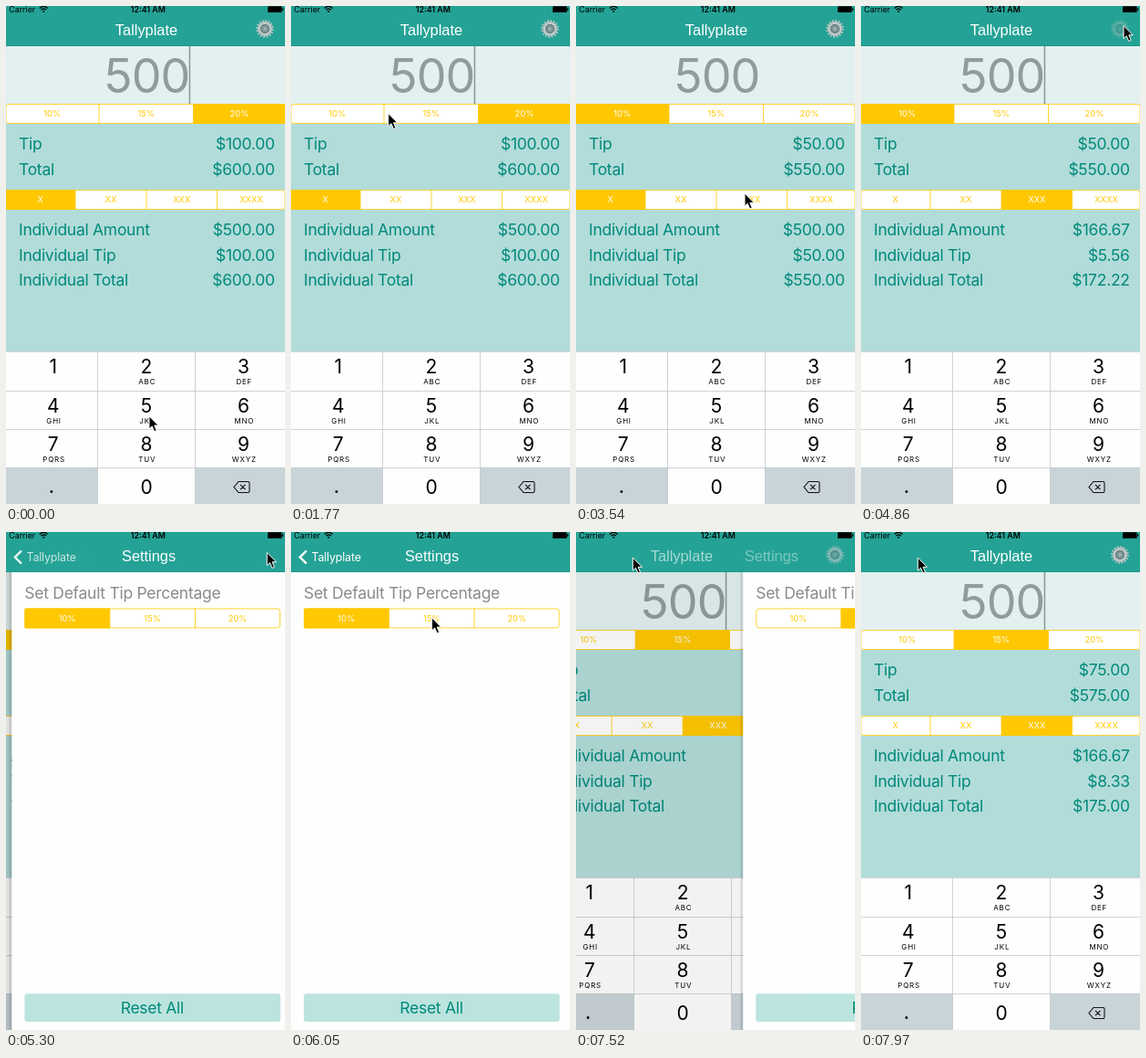
These frames come from a looping animation (306x545 px, 8 s). An HTML page:

```html
<!DOCTYPE html>
<html lang="en">
<head>
<meta charset="utf-8">
<title>Tip calculator</title>
<style>
html, body { margin: 0; width: 100%; height: 100%; overflow: hidden; background: #fff; }
svg { display: block; width: 306px; height: 545px; font-family: Inter, Roboto, sans-serif; }
.row { font-size: 17.5px; letter-spacing: -.28px; fill: #00897b; }
.seg { font-size: 9.4px; text-anchor: middle; }
.title { font: 16.4px "Liberation Sans", sans-serif; fill: #fff; text-anchor: middle; }
.digit { font-size: 21px; text-anchor: middle; }
.abc { font-size: 8px; letter-spacing: .8px; text-anchor: middle; }
</style>
</head>
<body>
<svg id="stage" viewBox="0 0 306 545"></svg>
<script>
const stage = document.getElementById('stage');
const LOOP = 8000, STEP = 147.5, BILL = 500;
const RATES = [10, 15, 20], GOLD = '#ffc800', APP = 'Tallyplate';
const TIMES = { ten: 2200, split: 3680, press: 4860, push: 5165, fifteen: 6480, pop: 7470, slide: 200 };

// Pointer stops: time, x, y
const PATH = [
  [0, 157, 448.7], [590, 120, 300], [1180, 84, 150], [1770, 106.7, 117.5],
  [2210, 48, 118], [2800, 45, 116], [3000, 45, 116], [3540, 185, 205],
  [4130, 185, 205], [4860, 288, 21.5], [5300, 288, 21.5], [6050, 154, 94],
  [6360, 154, 94], [6930, 73.2, 51.5], [7230, 62.3, 28], [LOOP, 62.3, 28]
];

const rect = (x, y, w, h, fill, more = '') =>
  `<rect x="${x}" y="${y}" width="${w}" height="${h}" fill="${fill}" ${more}/>`;
const text = (x, y, s, cls, more = '') =>
  `<text x="${x}" y="${y}" class="${cls}" ${more}>${s}</text>`;
const group = (x, opacity, body) =>
  `<g transform="translate(${x})" opacity="${opacity}">${body}</g>`;
const money = v => '$' + v.toFixed(2);

// Segmented control; edges are the cell borders
function segments(edges, y, labels, selected) {
  const left = edges[0], width = edges[edges.length - 1] - left, height = 22;
  let out = rect(left, y, width, height, '#fff', 'rx="3"');
  labels.forEach((label, i) => {
    const x = edges[i], w = edges[i + 1] - x, on = i === selected;
    if (on) out += rect(x, y, w, height, GOLD, 'rx="1"');
    if (i) out += rect(x - .4, y, .8, height, GOLD);
    out += text(x + w / 2, y + 14.4, label, 'seg', `fill="${on ? '#fff' : GOLD}"`);
  });
  return out + rect(left + .5, y + .5, width - 1, height - 1, 'none', `rx="3" stroke="${GOLD}" stroke-width=".8"`);
}

function keypad() {
  const xs = [51.8, 154, 260.5], tops = [378, 421, 463, 505];
  const letters = ['', 'ABC', 'DEF', 'GHI', 'JKL', 'MNO', 'PQRS', 'TUV', 'WXYZ'];
  let out = rect(0, 378, 306, 167, '#fefefe') +
    rect(0, 505, 100.5, 40, '#c9d4d9') + rect(207.5, 505, 98.5, 40, '#c9d4d9');
  letters.forEach((s, i) => {
    const x = xs[i % 3], y = tops[i / 3 | 0];
    out += text(x, y + 23.7, i + 1, 'digit') + text(x + .8, y + 35.6, s, 'abc');
  });
  out += text(154, 533.5, 0, 'digit') + text(50, 532.5, '.', 'digit', 'font-weight="500"');
  for (const y of tops) out += rect(0, y, 306, .8, '#c4c9cc');
  for (const x of [100, 207]) out += rect(x, 378, .8, 167, '#c4c9cc');
  return out + '<path d="M255 520.5H265.5Q267 520.5 267 522V531Q267 532.5 265.5 532.5H255L250 526.5ZM257 523.8L262.5 529.2M262.5 523.8L257 529.2" fill="none" stroke="#111" stroke-width="1.1"/>';
}
const KEYPAD = keypad();

const GEAR = `<g transform="translate(284 25)" fill="none">
  <circle r="8.8" stroke="#b9c4c3" stroke-width="2" stroke-dasharray="1.8 1.656"/>
  <circle r="6.4" stroke="#c3c8c8" stroke-width="3"/>
  <circle r="4.3" fill="#7f9a9b" stroke="#6f7a7b" stroke-width="1.3"/>
  <circle r="1.4" fill="#a9b5b6"/></g>`;

const STATUS = text(3.3, 7.2, 'Carrier', '', 'font-size="8.8"') +
  text(155.8, 7.2, '12:41 AM', '', 'font-size="8.8" font-weight="600" text-anchor="middle"') +
  `<g fill="none" stroke="#000" stroke-width="1.3">
    <path d="M36.8 2.4Q41.2 -1.6 45.6 2.4M38.6 4.3Q41.2 1.9 43.8 4.3"/>
    <path d="M41.2 5.1V6.8" stroke-width="1.8"/></g>` +
  rect(287, .3, 15.6, 6.8, '#000', 'rx="1.2"') + rect(303, 2.4, 1.2, 2.6, '#000');

const POINTER = '<path d="M0 0V14.2L3.2 11.2L5.7 17L8.2 15.9L5.8 10.3H10.2Z" stroke="#fff" stroke-width="1"/>';

function calculator(rate, people, caret) {
  const share = BILL / people, tip = BILL * RATES[rate] / 100;
  const shareTip = tip / people / people;
  const rows = [
    [157, 'Tip', tip], [185, 'Total', BILL + tip],
    [251, 'Individual Amount', share], [279, 'Individual Tip', shareTip],
    [306, 'Individual Total', share + shareTip]
  ];
  return rect(0, 44, 306, 334, '#b2dcd9') + rect(0, 44, 306, 63, '#e3f0f0') +
    text(201.5, 95, BILL, '', 'font-size="52" letter-spacing="-.9" fill="#909c9b" text-anchor="end"') +
    (caret ? rect(200.7, 44, 1.5, 63, '#899796') : '') +
    segments([-.5, 102, 205.5, 306.5], 107, RATES.map(r => r + '%'), rate) +
    segments([-.5, 76, 154, 231.5, 306.5], 201, ['X', 'XX', 'XXX', 'XXXX'], people - 1) +
    rows.map(([y, label, value]) => text(14, y, label, 'row') +
      text(294.7, y, money(value), 'row', 'text-anchor="end"')).join('') +
    KEYPAD;
}

function settings(rate) {
  return rect(-3, 44, 3, 501, '#000', 'opacity=".1"') + rect(0, 44, 306, 501, '#fefefe') +
    text(14, 73, 'Set Default Tip Percentage', 'row', 'style="fill:#8a8a8a"') +
    segments([14, 107.5, 201, 294.6], 83.4, RATES.map(r => r + '%'), rate) +
    rect(14, 505.3, 280.6, 30.7, '#bce4df', 'rx="3"') +
    text(154, 527, 'Reset All', 'row', 'text-anchor="middle"');
}

// Share of the settings page shown, p = 0..1
function navBar(p, pressed) {
  return rect(0, 0, 306, 44, '#24a295') + rect(0, 43.4, 306, .6, '#1c9186') +
    group(-95 * p, 1 - p, text(154, 32, APP, 'title')) +
    group(100 * (1 - p), p, text(154.5, 32, 'Settings', 'title')) +
    group(0, (1 - p) * (pressed ? .35 : 1), GEAR) +
    group(0, p ** 6, '<path d="M17 20.5L9.8 27.6L17 34.7" fill="none" stroke="#fff" stroke-width="2.4"/>') +
    group(0, p ** 14, text(22.5, 32, APP, '', 'font-size="12.4" letter-spacing="-.15" fill="#fff"')) +
    STATUS;
}

function slide(t, start) {
  const u = Math.min(1, Math.max(0, (t - start) / TIMES.slide));
  return 1 - (1 - u) ** 3;
}

function pointerAt(t) {
  const i = PATH.findIndex(k => k[0] > t);
  const [t0, x0, y0] = PATH[i - 1], [t1, x1, y1] = PATH[i];
  const u = (t - t0) / (t1 - t0);
  return [x0 + (x1 - x0) * u, y0 + (y1 - y0) * u];
}

function draw(t) {
  const rate = t < TIMES.ten ? 2 : t < TIMES.fifteen ? 0 : 1;
  const people = t < TIMES.split ? 1 : 3;
  const p = slide(t, TIMES.push) - slide(t, TIMES.pop);
  const blink = t % 1000;
  const caret = t > TIMES.push || blink < 380 || blink > 750;
  const pressed = t >= TIMES.press - 5 && t < TIMES.pop;
  stage.innerHTML =
    group(-92 * p, 1, calculator(rate, people, caret)) +
    rect(0, 44, 306, 501, '#000', `opacity="${.12 * p}"`) +
    (p > 0 ? group(306 * (1 - p), 1, settings(rate)) : '') +
    navBar(p, pressed) +
    `<g transform="translate(${pointerAt(t)})">${POINTER}</g>`;
}

// The screen advances in even steps, about seven a second
let shown = -1;
function tick() {
  const step = Math.floor((performance.now() % LOOP + 12) / STEP);
  if (step !== shown) draw((shown = step) * STEP);
  requestAnimationFrame(tick);
}
tick();
</script>
</body>
</html>
```
